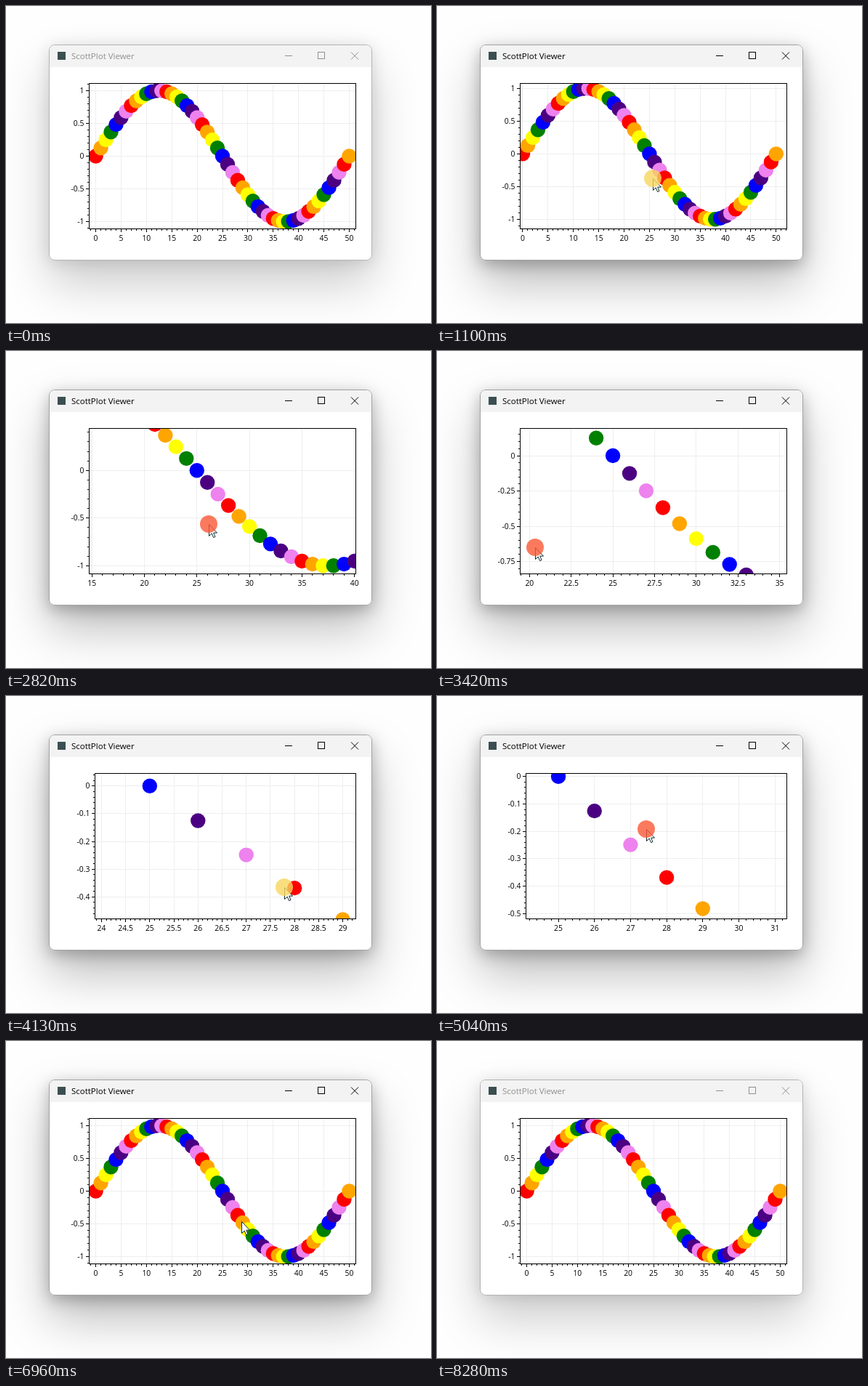
Write an HTML page with a canvas that moves like this. It is 585 by 436 pixels and loops after 8380 ms.

```html
<!DOCTYPE html>
<html lang="en">
<head>
<meta charset="utf-8">
<title>ScottPlot Viewer</title>
<style>
  html, body { margin: 0; width: 100%; height: 100%; overflow: hidden; background: #fefefe; }
  .shade, .win { position: absolute; left: 59px; top: 53px; width: 445px; height: 297px; border-radius: 8px; }
  .shade { box-shadow: 0 32px 64px rgba(0,0,0,.2), 0 2px 21px rgba(0,0,0,.12); }
  .active .shade { box-shadow: 0 32px 64px rgba(0,0,0,.26), 0 6px 21px rgba(0,0,0,.26); }
  .win { box-sizing: border-box; border: 1px solid #b4b4b4; background: #fff; overflow: hidden; color: #8f8f8f; }
  .active .win { color: #000; border-color: #a2a2a2; }
  .bar { height: 30px; background: #f3f3f3; }
  .icon { position: absolute; left: 11px; top: 9px; width: 11px; height: 11px; background: #3b4f52; }
  .name {
    position: absolute; left: 30px; top: 0; white-space: nowrap;
    font: 11.5px/30px "Open Sans", "Noto Sans", sans-serif;
  }
  .keys { position: absolute; left: 0; top: 0; fill: none; stroke: currentColor; }
  canvas { position: absolute; left: 0; top: 0; }
</style>
</head>
<body>
<div class="shade"></div>
<div class="win">
  <div class="bar"></div>
  <div class="icon"></div>
  <div class="name">ScottPlot Viewer</div>
  <svg class="keys" width="443" height="30">
    <path d="M324 14.5h10M415 9.5l10 10M425 9.5l-10 10"/>
    <rect x="369.5" y="9.5" width="9" height="9"/>
  </svg>
</div>
<canvas id="c" width="585" height="436"></canvas>
<script>
const ctx = document.getElementById('c').getContext('2d');
const LOOP = 8380, STEPS = 83;
const TOP = 106, LEFT = 114, RIGHT = 481, BOTTOM = 306;
const COLORS = ['red', 'orange', 'yellow', 'green', 'blue', 'indigo', 'violet'];
const GLOW = { pan: 'rgba(247,214,94,.8)', zoom: 'rgba(250,89,54,.8)' };
const HOME = { cx: 25, cy: 0, rx: 52.6, ry: 2.22 };
const FOCUS = 10, RESET = 67, GONE = 76, BLUR = 82;

// Pointer path: step, x, y, and what the mouse button starts or ends there.
const PATH = [
  [3, 345, 411],
  [10, 303, 240, 'pan'],
  [17, 264, 218],
  [20, 286, 211, 'up'],
  [23, 109, 277, 'zoom'],
  [28, 279, 238],
  [32, 502, 177, 'up'],
  [34, 135, 270, 'zoom'],
  [38, 462, 187, 'up'],
  [39, 324, 223, 'pan'],
  [41, 383, 263],
  [45, 305, 249, 'up'],
  [48, 341, 182, 'zoom'],
  [50, 288, 183],
  [53, 100, 185],
  [56, 323, 181, 'zoom'],
  [59, 235, 261],
  [60, 222, 275, 'up'],
  [62, 300, 231],
  [64, 300, 231],
  [65, 300, 227],
  [68, 300, 227],
  [75, 471, 371]
];

// Each drag runs from its button press to the next marked point.
const marks = PATH.filter(p => p[3]);
const DRAGS = marks.map((p, i) => ({ kind: p[3], from: p[0], to: (marks[i + 1] || p)[0] }))
  .filter(d => d.kind !== 'up');

function pointer(s) {
  const i = PATH.findIndex(p => p[0] >= s);
  if (i < 0) return PATH[PATH.length - 1].slice(1, 3);
  if (i === 0) return PATH[0].slice(1, 3);
  const [t0, x0, y0] = PATH[i - 1], [t1, x1, y1] = PATH[i];
  const f = (s - t0) / (t1 - t0);
  return [x0 + (x1 - x0) * f, y0 + (y1 - y0) * f];
}

// Replays every drag so far: panning moves the centre, zooming scales the ranges.
function viewAt(s) {
  const v = { ...HOME }, w = RIGHT - LEFT, h = BOTTOM - TOP;
  if (s >= RESET) return v;
  const scale = (d, size) => Math.pow(10, d / (Math.abs(d) + size));
  for (const d of DRAGS) {
    if (s <= d.from) break;
    const [x0, y0] = pointer(d.from), [x1, y1] = pointer(Math.min(s, d.to));
    const dx = x1 - x0, dy = y1 - y0;
    if (d.kind === 'pan') {
      v.cx -= dx * v.rx / w;
      v.cy += dy * v.ry / h;
    } else {
      v.rx /= scale(dx, w);
      v.ry /= scale(-dy, h);
    }
  }
  return v;
}

// Subdivide by 2, 2, 2.5 until dense enough, then go two levels back.
function tickStep(range, dense) {
  const list = [10 * Math.pow(10, Math.floor(Math.log10(range)))];
  for (let i = 0; range / list[i] < dense; i++) list.push(list[i] / [2, 2, 2.5][i % 3]);
  return list[Math.max(0, list.length - 3)];
}

function ticks(mid, range, step) {
  const minor = step / 5, list = [];
  const end = Math.floor((mid + range / 2) / minor + 1e-6);
  for (let i = Math.ceil((mid - range / 2) / minor - 1e-6); i <= end; i++)
    list.push({ v: i * minor, major: i % 5 === 0 });
  return list;
}

function disc(x, y, r, color) {
  ctx.fillStyle = color;
  ctx.beginPath();
  ctx.arc(x, y, r, 0, 7);
  ctx.fill();
}

function drawPlot({ cx, cy, rx, ry }) {
  const stepX = tickStep(rx, 23), stepY = tickStep(ry, 12);
  const left = LEFT + (stepY < .2 ? 8 : 0), w = RIGHT - left, h = BOTTOM - TOP;
  const px = x => left + .5 + w * (.5 + (x - cx) / rx);
  const py = y => TOP + .5 + h * (.5 - (y - cy) / ry);
  const tx = ticks(cx, rx, stepX), ty = ticks(cy, ry, stepY);
  const snapX = k => Math.floor(px(k.v)), snapY = k => Math.floor(py(k.v));
  const text = v => String(+v.toFixed(4) || 0);

  ctx.fillStyle = '#eee';
  for (const k of tx) if (k.major) ctx.fillRect(snapX(k), TOP, 1, h);
  for (const k of ty) if (k.major) ctx.fillRect(left, snapY(k), w, 1);

  ctx.save();
  ctx.beginPath();
  ctx.rect(left, TOP, w + 1, h + 1);
  ctx.clip();
  for (let i = 0; i <= 50; i++)
    disc(px(i), py(Math.sin(i * Math.PI / 25)), 10.2, COLORS[i % 7]);
  ctx.restore();

  ctx.strokeStyle = ctx.fillStyle = '#000';
  ctx.lineWidth = 1;
  ctx.strokeRect(left + .5, TOP + .5, w, h);
  ctx.font = '10.4px "Open Sans", "Noto Sans", sans-serif';
  ctx.textAlign = 'center';
  for (const k of tx) {
    ctx.fillRect(snapX(k), BOTTOM + 1, 1, k.major ? 4 : 2);
    if (k.major) ctx.fillText(text(k.v), px(k.v), BOTTOM + 17);
  }
  ctx.textAlign = 'right';
  for (const k of ty) {
    const len = k.major ? 4 : 2;
    ctx.fillRect(left - len, snapY(k), len, 1);
    if (k.major) ctx.fillText(text(k.v), left - 6.5, snapY(k) + 4);
  }
}

const arrow = new Path2D('M.5 .5V16.5L4.2 13 6.6 18.6 9 17.5 6.7 12.1H11.5Z');
function drawPointer(x, y, glow) {
  ctx.save();
  ctx.translate(Math.round(x), Math.round(y));
  ctx.fillStyle = '#fff';
  ctx.strokeStyle = '#10282a';
  ctx.fill(arrow);
  ctx.stroke(arrow);
  if (glow) disc(0, 0, 12, glow);
  ctx.restore();
}

// The screen refreshes in even steps, each a touch early.
function render(now) {
  const s = Math.floor((now % LOOP + 20) * STEPS / LOOP) % STEPS;
  document.body.classList.toggle('active', s >= FOCUS && s < BLUR);
  ctx.clearRect(0, 0, 585, 436);
  drawPlot(viewAt(s));
  if (s >= PATH[0][0] && s < GONE) {
    const drag = DRAGS.find(d => s >= d.from && s <= d.to);
    drawPointer(...pointer(s), drag && GLOW[drag.kind]);
  }
}

const start = performance.now();
function loop() {
  render(performance.now() - start);
  requestAnimationFrame(loop);
}
loop();
</script>
</body>
</html>
```
